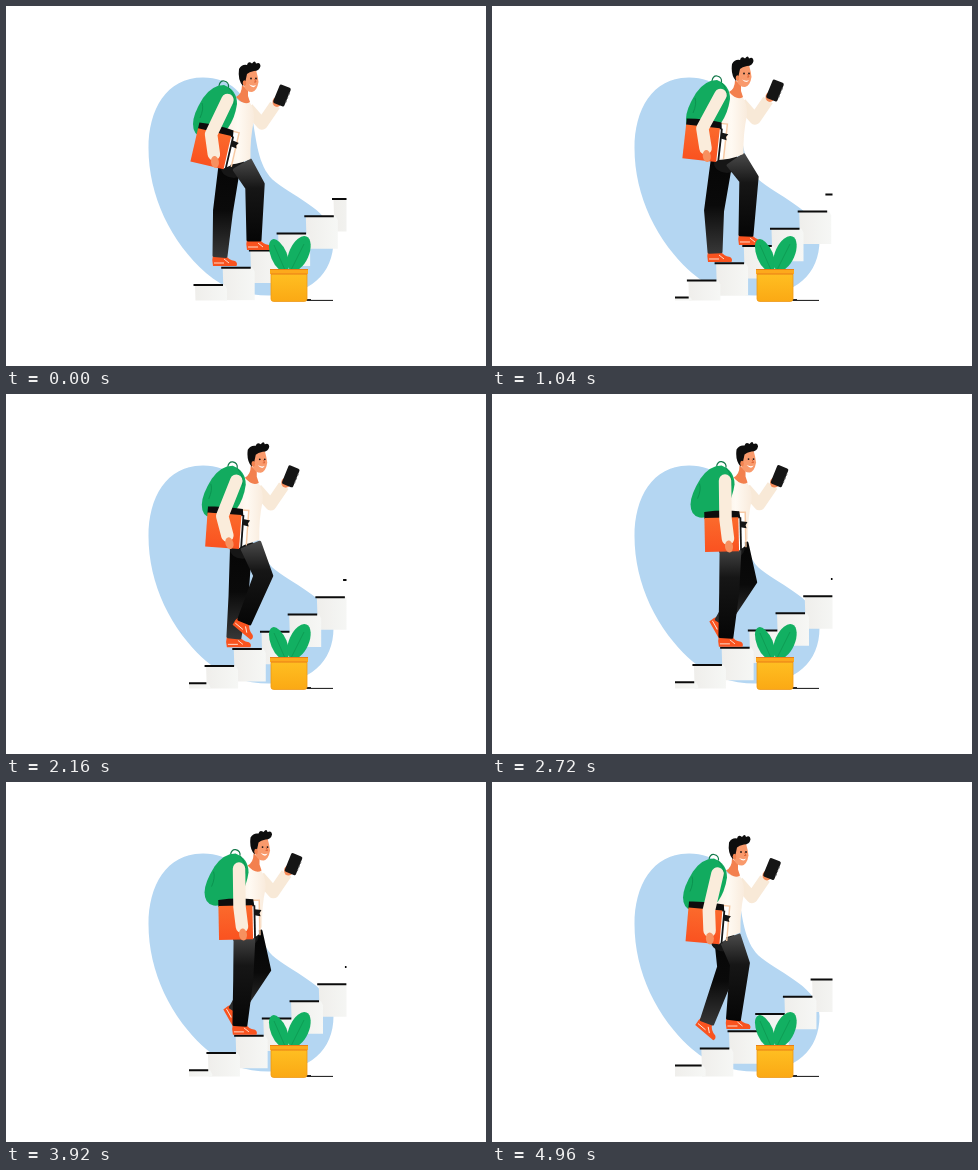
Write an HTML page that moves like this. It is 480x360 px and loops after 5 s.

```html
<!DOCTYPE html>
<html lang="en">
<head>
<meta charset="utf-8">
<title>Climbing the stairs</title>
<style>
html, body { margin: 0; width: 100%; height: 100%; overflow: hidden; background: #fff; }
svg { display: block; width: 100vw; height: 100vh; }
.leg { stroke-width: 3; stroke-linejoin: round; }
.near { fill: url(#near); stroke: url(#near); }
.far { fill: url(#far); stroke: url(#far); }
</style>
</head>
<body>
<svg viewBox="0 0 480 360">
  <defs>
    <linearGradient id="near" x1="0" y1="0" x2="0" y2="1">
      <stop offset="0" stop-color="#484848"/><stop offset=".35" stop-color="#161616"/><stop offset="1" stop-color="#060606"/>
    </linearGradient>
    <linearGradient id="far" x1="0" y1="0" x2="0" y2="1">
      <stop offset="0" stop-color="#060606"/><stop offset=".5" stop-color="#0a0a0a"/><stop offset="1" stop-color="#363636"/>
    </linearGradient>
    <linearGradient id="stone">
      <stop offset="0" stop-color="#efeeeb"/><stop offset="1" stop-color="#f6f7f5"/>
    </linearGradient>
    <linearGradient id="cover" x1="0" y1="0" x2="0" y2="1">
      <stop offset="0" stop-color="#fb6a2c"/><stop offset="1" stop-color="#fa5220"/>
    </linearGradient>
    <linearGradient id="shirt">
      <stop offset="0" stop-color="#f8ead9"/><stop offset=".6" stop-color="#fffaf3"/><stop offset="1" stop-color="#f9ebdc"/>
    </linearGradient>
    <linearGradient id="pot" x1="0" y1="0" x2="0" y2="1">
      <stop offset="0" stop-color="#ffc023"/><stop offset="1" stop-color="#fba914"/>
    </linearGradient>
    <clipPath id="stage"><path d="M183 150H340.500V294.500H183Z"/></clipPath>
    <g id="shoe">
      <path fill="#f9531f" d="M-7-1L5-2Q8 4 15 5Q18 7 16.500 10H-7Q-8.500 4-7-1Z"/>
      <path d="M4 3L9 7M-6 7H4" fill="none" stroke="#ffe9dc" stroke-width=".9"/>
    </g>
  </defs>

  <path fill="#b4d6f2" d="M197 71.500C160 71.500 142.500 104 142.500 142C142.500 190 165 236 200 267C218 283 240 289.500 263 289.500C304 289.500 327.500 268 327.500 234C327.500 206 290 192.500 269.500 176C253 163 251 139 247 116C241 88 224 71.500 197 71.500Z"/>
  <g id="stairs" clip-path="url(#stage)"></g>

  <g class="body">
    <path d="M242 102L256 118L269 99" fill="none" stroke="#f8e9d7" stroke-width="11.500" stroke-linejoin="round"/>
    <ellipse cx="271" cy="96" rx="4.500" ry="5" fill="#f58a58"/>
    <g transform="translate(276 89.500) rotate(22)">
      <rect x="-6" y="-10" width="12" height="20" rx="1.800" fill="#151515"/>
      <path d="M6-5V7" stroke="#666" stroke-width="1" stroke-dasharray="2 2"/>
    </g>
  </g>

  <use id="footB" href="#shoe"/>
  <path id="legB" class="leg far"/>
  <ellipse id="pelvis" rx="13" ry="10" fill="#161616"/>
  <use id="footA" href="#shoe"/>
  <path id="legA" class="leg near"/>

  <g class="body">
    <path fill="url(#shirt)" d="M229 91Q235 99 243 95Q249 104 248 114Q244 132 244.500 153Q228 160.500 208 159Q209 122 217 99Z"/>
    <path fill="#f3804e" d="M236 79L242 84L242 90L244 96Q238 100 230 91Q236 88 236 79Z"/>
    <path fill="#f99a6c" d="M238 66L250 64Q252 71 252.500 76Q251 85 246 86Q240 86 238 80Z"/>
    <path fill="#0d0d0d" d="M233 63Q236 58 241 59Q242 54.500 246 57.500Q249 53.500 250 57.500Q254 55.500 254.500 60Q253.500 65 248 65Q243 66 241 68L239.500 75L237 80Q231.500 74 233 63Z"/>
    <ellipse cx="238.500" cy="77" rx="1.800" ry="2.800" fill="#f38350"/>
    <g fill="#1d1414"><circle cx="245" cy="72.500" r=".9"/><circle cx="250" cy="72.500" r=".9"/></g>
    <path d="M248.500 73L250 76H248" fill="none" stroke="#dd6032" stroke-width=".9"/>
    <path id="smile" d="M243 78.500Q247 80.500 250 79Q248 83.500 243 78.500Z" fill="#fff"/>
    <path d="M213 80Q214 74.500 218 75Q223 76 222.500 81" fill="none" stroke="#13784a" stroke-width="1.200"/>
    <path fill="#12ab5f" d="M187 118Q187 108 197 92Q206 79 218 79Q231 84 231 98Q229 112 222 122Q208 132 196 131Q187 129 187 118Z"/>
    <path d="M196 97Q198 103 194 112M222 81Q229 88 228 99" fill="none" stroke="#0b9350" stroke-width="1"/>
  </g>

  <g id="book">
    <path d="M14-21H22V13L15 18Z" fill="#fff"/>
    <path d="M16-21H23V14" fill="none" stroke="#f7c9a4" stroke-width="1.400"/>
    <path d="M18-16V17" stroke="#151515" stroke-width="1.800"/>
    <path d="M18-12L25-11L23-8L24-5L18-6Z" fill="#151515"/>
    <path d="M-18-22Q0-24 17-22L18-15H-18Z" fill="#0d0d0d"/>
    <path d="M-18-16H16V18H-18Z" fill="url(#cover)"/>
  </g>
  <path id="arm" fill="none" stroke="#faecdb" stroke-width="12.500" stroke-linejoin="round" stroke-linecap="round"/>
  <ellipse id="hand" rx="4" ry="6" fill="#f7905f"/>

  <path d="M300 294H305" stroke="#111" stroke-width="1.800"/>
  <path d="M305 294.400H327" stroke="#111" stroke-width="1"/>
  <g fill="#12b062">
    <ellipse rx="8" ry="17.500" transform="translate(273 249.500) rotate(-23)"/>
    <ellipse rx="9.800" ry="18.500" transform="translate(293 247.500) rotate(24)"/>
  </g>
  <path d="M268 239L279 264M298 238L285 264" stroke="#0d9751" stroke-width=".8"/>
  <path d="M265 266H301V293Q301 295.500 298 295.500H268Q265 295.500 265 293Z" fill="url(#pot)" stroke="#ef9a18" stroke-width=".8"/>
  <path d="M264 263H302V268H264Z" fill="#fda91c"/>
  <path d="M264 263.500H302M265 268H301" stroke="#e97f16" stroke-width="1.200"/>
</svg>
<script>
const $ = id => document.getElementById(id);
const LOOP = 5000, STEP = 600, CYCLE = 2 * STEP, TICK = 40;
const RUN = 27.7, RISE = 17.2;

// phase, body x y, near knee x y, ankle x y, foot turn, far leg likewise, book x y turn
const KEYS = [
  [0,    247, 56,    249, 180, 248, 234, 0,    217, 205, 214, 250, 0,   -41, 86, 13],
  [.133, 251, 53.5,  248, 182, 241.5, 237, 0,  235, 186, 215, 240, 40,  -38, 89.5, 5],
  [.283, 259, 48.5,  236, 200, 233, 243.5, 0,  257, 187, 231, 228, 60,  -27, 91, -2],
  [.433, 257, 54,    228, 205, 225, 248, 0,    263, 183, 240, 231, 22,  -25, 88, -10],
  [.5,   254, 56,    223, 207, 220, 250, 4,    259, 181, 249, 234, 0,   -25, 88, -10],
  [.667, 254, 52,    236, 187, 216, 236, 38,   250, 184, 234, 238, 0,   -26, 88, -8],
  [.767, 256, 48.5,  255, 186, 230, 228, 55,   238, 200, 230, 242, 0,   -34, 88, 3],
  [.867, 254, 51,    257, 173, 254, 229, 0,    222, 205, 223, 246, 0,   -45, 87, 10]
];

function keyAt(i) {
  const n = KEYS.length, turn = Math.floor(i / n), k = KEYS[i - turn * n];
  return [k[0] + turn, ...k.slice(1)];
}

// Smooth periodic interpolation of every column
function poseAt(phase) {
  let i = KEYS.length - 1;
  while (KEYS[i][0] > phase) i--;
  const [a, b, c, d] = [i - 1, i, i + 1, i + 2].map(keyAt);
  const h = c[0] - b[0], u = (phase - b[0]) / h, v = 1 - u;
  return b.slice(1).map((p, j) => {
    const q = c[j + 1];
    const m = (q - a[j + 1]) / (c[0] - a[0]) * h;
    const n = (d[j + 1] - p) / (d[0] - b[0]) * h;
    return p * v * v * (1 + 2 * u) + q * u * u * (3 - 2 * u) + m * u * v * v - n * u * u * v;
  });
}

const fix = n => n.toFixed(2);
const place = (el, x, y, r = 0) =>
  el.setAttribute("transform", `translate(${fix(x)} ${fix(y)}) rotate(${fix(r)})`);

function unit(x, y) {
  const l = Math.hypot(x, y);
  return [x / l, y / l];
}

// A tapered limb through hip, knee and ankle
function leg(id, bx, by, [kx, ky, ax, ay, turn]) {
  const cx = bx - 19, hx = cx + (kx - cx) * .4, hy = by + 103;
  const n1 = unit(ky - hy, hx - kx), n2 = unit(ay - ky, kx - ax);
  const mid = unit(n1[0] + n2[0], n1[1] + n2[1]);
  const pt = (x, y, n, w) => `${fix(x + n[0] * w)} ${fix(y + n[1] * w)}`;
  $("leg" + id).setAttribute("d", "M" + [
    pt(hx, hy, n1, 9.5), pt(kx, ky, mid, 8.5), pt(ax, ay, n2, 6),
    pt(ax, ay, n2, -6), pt(kx, ky, mid, -8.5), pt(hx, hy, n1, -9.5)
  ].join("L") + "Z");
  place($("foot" + id), ax, ay, turn);
}

// Elbow of a two-part arm that bends backwards
function elbow(x, y, hx, hy, upper, fore) {
  const dx = hx - x, dy = hy - y;
  const d = Math.min(Math.hypot(dx, dy), upper + fore - .1);
  const along = (upper * upper - fore * fore + d * d) / (2 * d);
  const out = Math.sqrt(Math.max(0, upper * upper - along * along));
  return [x + (dx * along - dy * out) / d, y + (dy * along + dx * out) / d];
}

function stairs(t) {
  const k = t / STEP % 1;
  let blocks = "", treads = "";
  for (let i = 7; i >= -2; i--) {
    const x = 187.5 + (i - k) * RUN, y = 279 - (i - k) * RISE;
    if (x < 331) blocks += `<path d="M${fix(x + 1.5)} ${fix(y)}h30l2 4v28.500h-31z" fill="url(#stone)"/>`;
    treads += `<path d="M${fix(x)} ${fix(y)}h29.500" stroke="#0b0b0b" stroke-width="2"/>`;
  }
  $("stairs").innerHTML = blocks + treads;
}

function draw(t) {
  const p = poseAt(t / CYCLE % 1);
  const [bx, by] = p;
  const lift = Math.exp(-(((t - 1560) / 350) ** 2));
  stairs(t);
  for (const el of document.querySelectorAll(".body")) place(el, bx - 247, by - 56);
  place($("pelvis"), bx - 19, by + 106);
  leg("A", bx, by, p.slice(2, 7));
  leg("B", bx, by, p.slice(7, 12));

  const x = bx + p[12] + 11 * lift, y = by + p[13] - 14 * lift, turn = p[14] - 33 * lift;
  place($("book"), x, y, turn);
  const r = turn * Math.PI / 180, c = Math.cos(r), s = Math.sin(r);
  const hx = x + 6 * c - 13 * s, hy = y + 6 * s + 13 * c;
  const sx = bx - 25.5, sy = by + 38, [ex, ey] = elbow(sx, sy, hx, hy, 38, 28);
  const wx = ex + (hx - ex) * .72, wy = ey + (hy - ey) * .72;
  $("arm").setAttribute("d", `M${fix(sx)} ${fix(sy)}L${fix(ex)} ${fix(ey)}L${fix(wx)} ${fix(wy)}`);
  place($("hand"), hx, hy, Math.atan2(hy - ey, hx - ex) * 180 / Math.PI - 90);
  $("smile").setAttribute("opacity", fix(1 - lift));
}

function tick() {
  const t = performance.now() % LOOP;
  draw(Math.floor(t / TICK) * TICK);
  requestAnimationFrame(tick);
}
tick();
</script>
</body>
</html>
```
